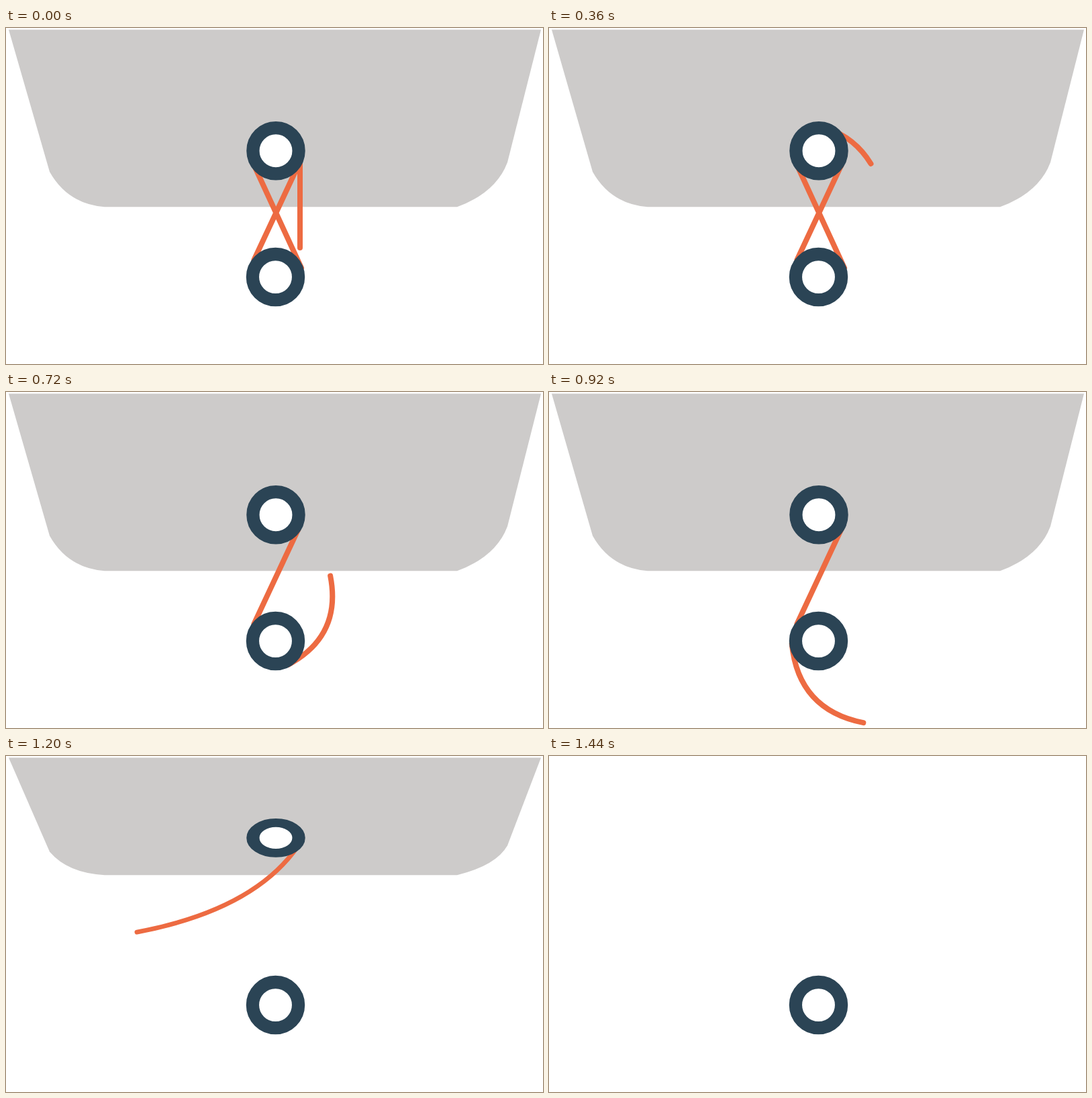
Write an HTML page that moves like this. It is 800 px wide and 500 px high and loops after 8 s.

```html
<!DOCTYPE html>
<html lang="en">
<head>
<meta charset="utf-8">
<title>String envelope</title>
<style>
  html, body { margin: 0; width: 100%; height: 100%; overflow: hidden; background: #fff; }
  svg { display: block; width: 100%; height: 100%; }
  .ring { fill: #fff; stroke: #2b4455; stroke-width: 19.3; }
  #string { fill: none; stroke: #ed6b42; stroke-linecap: round; stroke-linejoin: round; }
</style>
</head>
<body>
<svg viewBox="0 0 800 500">
  <path class="lid" fill="#cdcbca" d="M4 2.5H797L747 200Q730 245 672 266.3H147Q92 262 65 214Z"/>
  <path id="string"/>
  <circle class="ring lid" cx="402" cy="182.8" r="34.1"/>
  <circle class="ring" cx="401.5" cy="370.6" r="34.1"/>
</svg>
<script>
const LOOP = 8000, STEP = 40, HINGE = 2.5;
const TOP_FREE = 560, BOTTOM_FREE = 980, OPEN_START = 1020, OPEN_END = 1440;
const string = document.getElementById('string');
const lid = document.querySelectorAll('.lid');

// Straight runs wound between the two buttons
const runDown = 'M369 203L440 357';
const runUp = 'M436 203L369.5 345';

const along = ([x, y], degrees, length) => {
  const a = degrees * Math.PI / 180;
  return [x + length * Math.cos(a), y + length * Math.sin(a)];
};

// The loose end leaves its anchor at a heading, then bends by an angle
const looseEnd = (anchor, heading, bend, leg, tail = leg) => {
  const knee = along(anchor, heading, leg);
  return [anchor, knee, along(knee, heading + bend, tail)];
};

// Unwinds counterclockwise, gathering speed
function aroundTop(t) {
  const p = t / TOP_FREE;
  const heading = 90 - 205 * p ** 2.4;
  const anchor = along([402, 183], heading - 90, 36);
  return looseEnd(anchor, heading, 77 * p ** 1.5, 72 - 118 * p * (1 - p));
}

// Unwinds clockwise at a steady rate
function aroundBottom(t) {
  const p = (t - TOP_FREE) / (BOTTOM_FREE - TOP_FREE);
  const heading = 236 * p - 118;
  const anchor = along([401.5, 370.6], heading + 90, 40);
  return looseEnd(anchor, heading, -73, 85 + 16 * p);
}

// Hangs from the top button and whips upward
function hanging(t) {
  const u = (t - 960) / 160;
  return looseEnd([435, 201], 128 - 9 * u, 60 * u ** 1.7 - 70, 158, 138 + 29 * u);
}

function lidScale(t) {
  const p = Math.min(1, Math.max(0, (t - OPEN_START) / (OPEN_END - OPEN_START)));
  return 1 - p * p * (3 - 2 * p - 0.53 * (1 - p));
}

function stringPath(t, scale) {
  if (t >= OPEN_END) return '';
  const [wound, curve] =
    t < TOP_FREE ? [runDown + runUp, aroundTop(t)] :
    t < BOTTOM_FREE ? [runUp, aroundBottom(t)] : ['', hanging(t)];
  const [a, b, c] = curve.map(([x, y]) => `${x} ${HINGE + (y - HINGE) * scale}`);
  return `${wound}M${a}Q${b} ${c}`;
}

function draw(time) {
  const t = Math.floor(time % LOOP / STEP) * STEP;
  const scale = lidScale(t);
  for (const part of lid) {
    part.setAttribute('transform', `translate(0 ${HINGE * (1 - scale)}) scale(1 ${scale})`);
    part.style.display = t < OPEN_END ? '' : 'none';
  }
  string.setAttribute('d', stringPath(t, scale));
  string.setAttribute('stroke-width', 4.6 + 3.4 * scale);
}

const start = performance.now();
function frame() {
  draw(performance.now() - start);
  requestAnimationFrame(frame);
}
frame();
</script>
</body>
</html>
```
